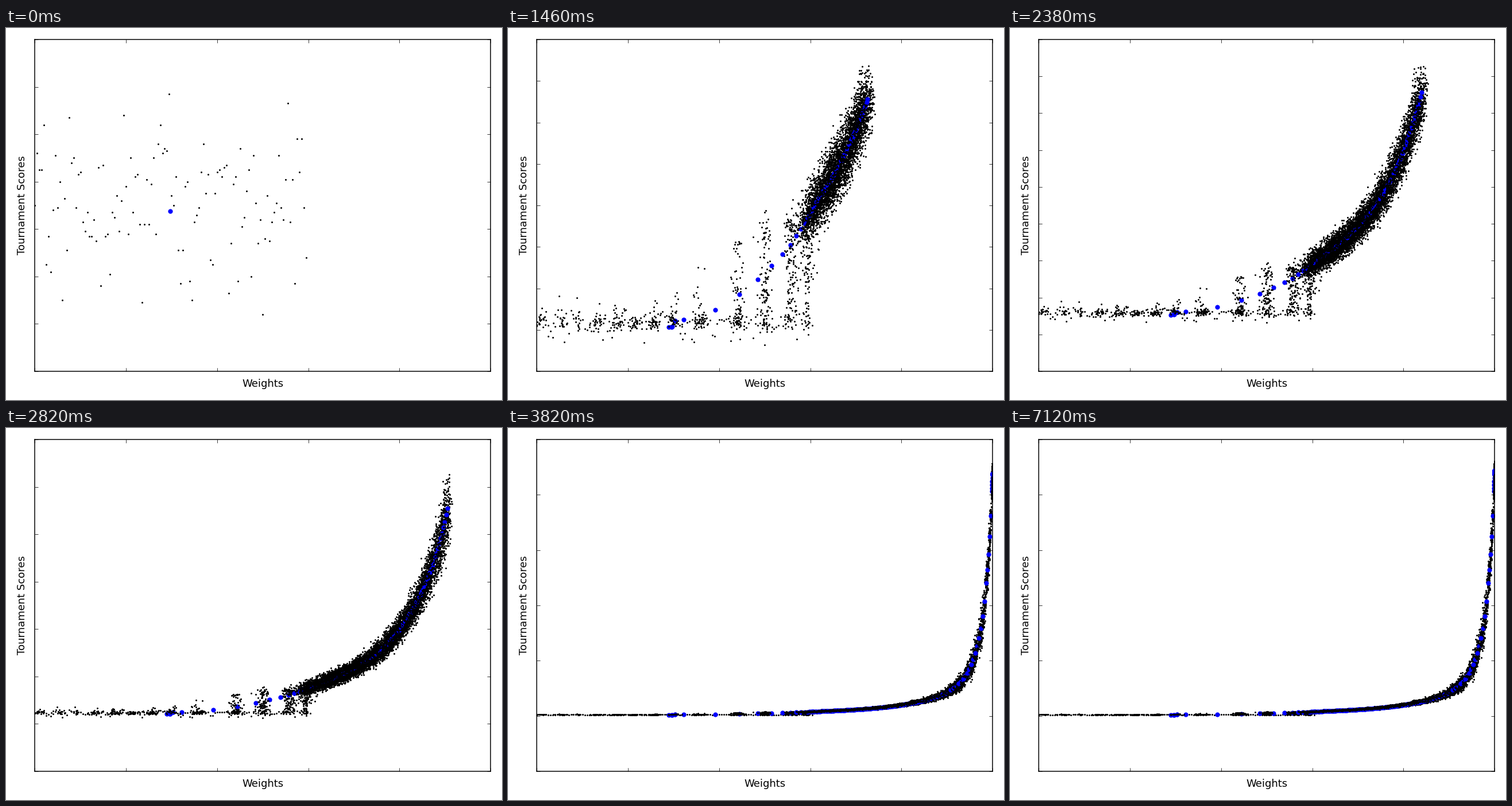
A matplotlib script that plays this animation: 864 px wide and 648 px high, repeating every 7.16 s.

```python
import numpy as np
import matplotlib.pyplot as plt
from matplotlib.animation import FuncAnimation

W, H, DPI = 864, 648, 108
LEFT, RIGHT, TOP, BOTTOM = 50.2, 844.2, 20, 598
GENS = 357
FAMILY_GENS = 12
rng = np.random.default_rng(12)

plt.rcParams["font.family"] = "DejaVu Sans"

FAMILIES = np.r_[np.linspace(.01, .3, 8), .356, .44, .5, .556, .594]


def mean_weight(g):
    """Drift at first, then a quick climb that settles into a slow one."""
    if g < 5:
        return .2975 + .008 * np.sin(2.4 * g)
    climb = np.interp(g, [20, 73, 119, 148, 156, 162, 167, 172, GENS],
                      [.612, .7255, .84, .926, .962, .986, .998, .9995, .9998])
    return climb - .29 * .76 ** (g - 5)


def mean_score(w):
    """A geometric sum cut off after 100 rounds."""
    gain = np.interp(w, [.2975, .303, .36, .45, .557, .617, .7255, .84, 1],
                     [75.5, 85, 82, 104, 135.6, 159, 180, 210, 224])
    return gain * (1 - w ** 100) / (1 - w)


def first_gen(n=120):
    z = rng.normal(size=n)
    return np.arange(n) * .005, np.interp(z, [z.min(), z.max()], [64, 157]).round()


def family_gen(g, n=62):
    """Offspring gathered around the families near the mean weight."""
    width = .04 + .3 * .7 ** max(g - 4, 0)
    odds = np.exp(-((FAMILIES - mean_weight(g)) / width) ** 2)
    w = rng.choice(FAMILIES, n, p=odds / odds.sum()) + rng.normal(0, .008, n)
    s = 110 + rng.exponential(12, n) + rng.normal(0, 5, n)
    if g > 4:
        f = (g - 4) / 10
        s += 250 * np.cbrt(np.clip((w - .3) / .27, 0, None)) * rng.beta(2 * f, 2 - 2 * f, n)
    return np.abs(w), s


def cloud_gen(g):
    n = 65 if g < 180 else 20
    m = mean_weight(g)
    noise = np.interp(m, [.6, .72, .84, .96, 1], [.072, .058, .056, .09, .0155])
    w = m + .015 * np.sqrt(1 - m) * rng.normal(size=n).clip(-2.5, 2.2)
    s = mean_score(m) * (1 + noise * rng.normal(size=n).clip(-2.6, 2.6))
    if g < 24:
        s *= np.where(rng.random(n) < .08, rng.uniform(.55, 1, n), 1)
    return np.minimum(w, 1), s


def make_gen(g):
    if g == 0:
        return first_gen()
    return family_gen(g) if g <= FAMILY_GENS else cloud_gen(g)


def view(lo, hi):
    """Round the padded data range out to at most nine even steps."""
    pad = .05 * (hi - lo)
    lo, hi = lo - pad, hi + pad
    raw = (hi - lo) / 9
    mag = 10 ** np.floor(np.log10(raw))
    for step in mag * np.array([1, 2, 5, 10, 20]):
        bottom = np.floor(lo / step) * step
        if step >= raw and bottom + 9 * step >= hi:
            break
    return bottom, np.ceil(hi / step) * step, step


gens = [make_gen(g) for g in range(GENS)]
means = np.array([(w, mean_score(w)) for w in map(mean_weight, range(GENS))])
lows = np.minimum.accumulate([s.min() for _, s in gens])
highs = np.maximum.accumulate([s.max() for _, s in gens])

fig = plt.figure(figsize=(W / DPI, H / DPI), dpi=DPI, facecolor="white")
ax = fig.add_axes([LEFT / W, 1 - BOTTOM / H, (RIGHT - LEFT) / W, (BOTTOM - TOP) / H])
ax.set_xlim(0, 1)
ax.set_xticks(np.linspace(0, 1, 6))
ax.tick_params(direction="in", length=4, width=.5, top=True, right=True,
               labelbottom=False, labelleft=False)
for spine in ax.spines.values():
    spine.set_linewidth(1)
fig.text((LEFT + RIGHT) / 2 / W, 1 - 625 / H, "Weights", size=12,
         ha="center", va="baseline")
fig.text(33.4 / W, 1 - (TOP + BOTTOM) / 2 / H, "Tournament Scores", size=12,
         rotation=90, rotation_mode="anchor", ha="center", va="baseline")


class Block:
    """A few generations that share one layer of players and one of means."""

    def __init__(self, start, stop):
        self.start, self.stop, self.shown = start, stop, 0
        self.players, = ax.plot([], [], "o", color="black", ms=2, mew=0, visible=False)
        self.means, = ax.plot([], [], "o", color="blue", ms=5.47, mew=0, visible=False)

    def show(self, g):
        end = min(max(g + 1, self.start), self.stop)
        if end - self.start == self.shown:
            return
        self.shown = end - self.start
        for line in (self.players, self.means):
            line.set_visible(self.shown > 0)
        if self.shown:
            self.players.set_data(*np.hstack(gens[self.start:end]))
            self.means.set_data(*means[self.start:end].T)


edges = [*range(0, 180, 2), *range(180, GENS, 20), GENS]
blocks = [Block(a, b) for a, b in zip(edges, edges[1:])]


def draw(i):
    g = min(i, GENS - 1)
    for b in blocks:
        b.show(g)
    bottom, top, step = view(lows[g], highs[g])
    ax.set_yticks(np.arange(bottom, top + step / 2, step))
    ax.set_ylim(bottom, top)
    return []


anim = FuncAnimation(fig, draw, frames=GENS + 1, interval=20, repeat=True,
                     repeat_delay=0, blit=False)
plt.show()
```
